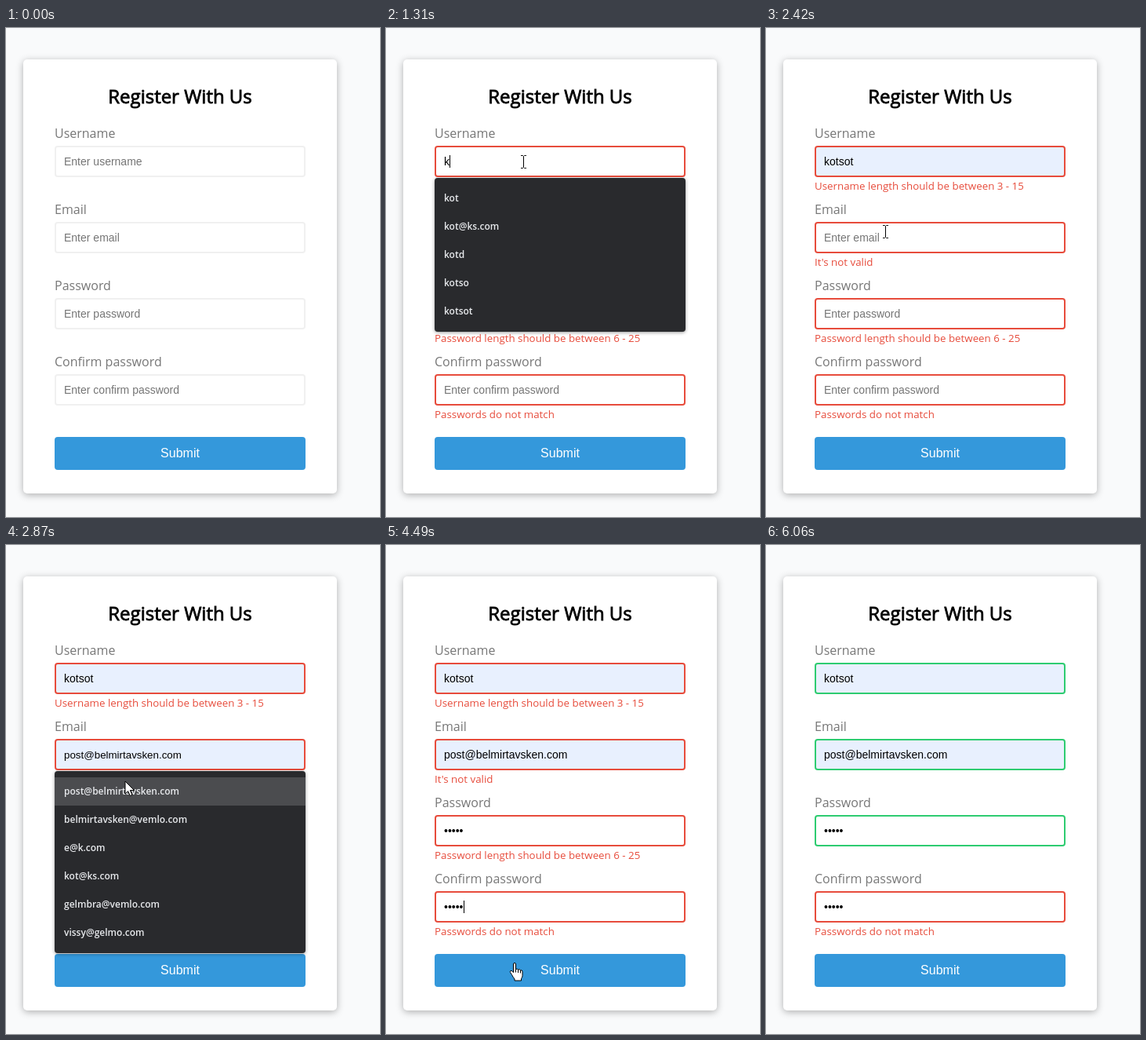
Recreate the animation shown at these times as an HTML page with a canvas. Size 477x623 px, loop 6.13 s.

```html
<!DOCTYPE html>
<html lang="en">
<head>
<meta charset="utf-8">
<title>Register form</title>
<style>
html, body { margin: 0; width: 100%; height: 100%; overflow: hidden; background: #f9fafb; }
canvas { display: block; width: 477px; height: 623px; }
</style>
</head>
<body>
<canvas id="stage" width="477" height="623"></canvas>
<script>
const ctx = document.getElementById('stage').getContext('2d');
const LOOP = 6130;
const SANS = '"Open Sans", sans-serif';
const ARIAL = '"Liberation Sans", Arial, sans-serif';
const RED = '#e74c3c', GREEN = '#2ecc71', PLAIN = '#f0f0f0';
const LEFT = 62, WIDTH = 320, ROW = 36, PAD = 8;

const USER = 'kotsot';
const MAIL = 'post@belmirtavsken.com';
const DOTS = '•••••';

const fields = [
  { label: 'Username', hint: 'Enter username', error: 'Username length should be between 3 - 15' },
  { label: 'Email', hint: 'Enter email', error: "It's not valid" },
  { label: 'Password', hint: 'Enter password', error: 'Password length should be between 6 - 25' },
  { label: 'Confirm password', hint: 'Enter confirm password', error: 'Passwords do not match' }
];
fields.forEach((f, i) => { f.y = 150 + i * 97; });

// Suggestion lists: field index, open and close times
const menus = [
  { field: 0, from: 960, to: 1310, items: ['belmirtavsken@vemlo.com', 'belmirtavsken', 'e@k.com', 'Gelmbra', 'VissyGelmo', 'belmirtavsken275'] },
  { field: 0, from: 1310, to: 1980, items: ['kot', 'kot@ks.com', 'kotd', 'kotso', USER] },
  { field: 1, from: 2640, to: 3180, items: [MAIL, 'belmirtavsken@vemlo.com', 'e@k.com', 'kot@ks.com', 'gelmbra@vemlo.com', 'vissy@gelmo.com'] }
];

// Pointer path: time, x, y
const path = [
  [50, 262, 640], [230, 275, 551], [500, 275, 551], [620, 288, 528],
  [930, 173, 169], [1300, 173, 169], [1500, 378, 245], [1690, 226, 368],
  [2000, 226, 368], [2380, 152, 259], [2700, 152, 259], [2950, 152, 314],
  [3180, 152, 314], [3310, 151, 350], [3700, 151, 350], [3920, 155, 448],
  [4200, 155, 448], [4480, 164, 533], [4860, 164, 533], [5220, 198, 388],
  [5280, 198, 390], [5480, 255, 640]
];
const presses = [[280, 480], [930, 1060], [1700, 1920], [2600, 2720], [3080, 3180], [3310, 3400], [3920, 4010], [4720, 4860]];
const focusTimes = [[960, 1980], [2620, 3180], [3310, 3920], [3920, 4720]];

const arrow = new Path2D('M0 0v16l3.7-3.5 2.6 6 2.6-1.1-2.6-5.9h5.2z');
const hand = new Path2D('M-1.5 1a1.5 1.5 0 0 1 3 0v6.5q2-1 3 .5q2-.8 3 .7q2.3-.5 2.5 1.8v5q0 2-1.5 4v2.5h-8.5v-2q-2-2.5-3.5-5.5l-2-3q-.8-1.5.5-2t2.5 1l1 1.2z');
const knuckles = new Path2D('M1.5 7.5v4M4.5 8v4M7.5 9v3.5');
const beam = new Path2D('M-3.5-7.5h2.5l1 1 1-1h2.5M0-6.5v14M-3.5 8.5h2.5l1-1 1 1h2.5');

const within = (t, [a, b]) => t >= a && t < b;
const clamp = (v, lo, hi) => Math.max(lo, Math.min(hi, v));
const dots = (t, start) => DOTS.slice(0, clamp(Math.floor((t - start) / 60), 0, 5));

function text(str, x, y, font, color, align = 'left') {
  ctx.font = font;
  ctx.fillStyle = color;
  ctx.textAlign = align;
  ctx.fillText(str, x, y);
}

function box(x, y, w, h, r, fill) {
  ctx.beginPath();
  ctx.roundRect(x, y, w, h, r);
  ctx.fillStyle = fill;
  ctx.fill();
}

function shadowBox(x, y, w, h, r, fill, blur, alpha) {
  ctx.save();
  ctx.shadowColor = `rgba(0,0,0,${alpha})`;
  ctx.shadowBlur = blur;
  ctx.shadowOffsetY = blur > 5 ? 2 : 1;
  box(x, y, w, h, r, fill);
  ctx.restore();
}

function pointerAt(t) {
  const i = path.findIndex(p => p[0] > t);
  if (i < 1) return null;
  const [t0, x0, y0] = path[i - 1], [t1, x1, y1] = path[i];
  const k = (t - t0) / (t1 - t0), e = k * k * (3 - 2 * k);
  return { x: x0 + (x1 - x0) * e, y: y0 + (y1 - y0) * e };
}

const menuTop = menu => fields[menu.field].y + 41;
const menuHeight = menu => menu.items.length * ROW + PAD * 2;

function hoveredRow(menu, p) {
  if (!menu || !p || p.x < LEFT || p.x > LEFT + WIDTH) return -1;
  const row = Math.floor((p.y - menuTop(menu) - PAD) / ROW);
  return row < menu.items.length ? Math.max(row, -1) : -1;
}

function valueOf(i, t) {
  if (i === 0) {
    if (t >= 1980) return { str: USER, filled: true, size: 14 };
    return { str: USER.slice(0, clamp(Math.floor((t - 1250) / 60), 0, 3)), size: 14 };
  }
  if (i === 1) return t >= 3180 ? { str: MAIL, filled: true, size: t < 3290 ? 13.33 : 14 } : { str: '', size: 14 };
  return { str: dots(t, i === 2 ? 3480 : 4000), size: 14 };
}

function drawField(f, i, t, preview) {
  const state = t < 440 ? PLAIN : t >= 4840 && i < 3 ? GREEN : RED;
  const value = preview ? { str: preview, filled: true, size: 13.33 } : valueOf(i, t);
  text(f.label, LEFT, f.y - 10, '16px ' + SANS, '#777');
  box(LEFT, f.y, WIDTH, 40, 4, state);
  box(LEFT + 2, f.y + 2, WIDTH - 4, 36, 2, value.filled ? '#e8f0fe' : '#fff');
  text(value.str || f.hint, 74, f.y + 25, value.size + 'px ' + ARIAL, value.str ? '#000' : '#757575');
  if (!preview && within(t, focusTimes[i])) {
    const w = value.str ? ctx.measureText(value.str).width : 0;
    ctx.fillStyle = '#000';
    ctx.fillRect(Math.round(74 + w), f.y + 12, 1, 16);
  }
  if (state === RED) text(f.error, LEFT, f.y + 56, '13.333px ' + SANS, RED);
}

function drawMenu(menu, row) {
  const top = menuTop(menu);
  shadowBox(LEFT, top, WIDTH, menuHeight(menu), 4, '#292a2d', 4, 0.4);
  menu.items.forEach((item, i) => {
    const y = top + PAD + i * ROW;
    if (i === row) {
      ctx.fillStyle = '#4b4c4f';
      ctx.fillRect(LEFT, y, WIDTH, ROW);
    }
    text(item, 74, y + 22, '600 12px ' + SANS, '#e8eaed');
  });
}

function drawPointer(p, t, menu) {
  if (presses.some(s => within(t, s))) {
    ctx.beginPath();
    ctx.arc(p.x - 1, p.y - 1, 12, 0, Math.PI * 2);
    ctx.fillStyle = 'rgba(255,255,0,.55)';
    ctx.fill();
  }
  const inColumn = p.x >= LEFT && p.x <= LEFT + WIDTH;
  const inMenu = menu && p.y >= menuTop(menu) && p.y < menuTop(menu) + menuHeight(menu);
  const inField = inColumn && !inMenu && fields.some(f => p.y >= f.y && p.y < f.y + 40);
  const inButton = inColumn && p.y >= 521 && p.y < 563;
  ctx.save();
  ctx.translate(Math.round(p.x) + (inField ? 0.5 : 0), Math.round(p.y));
  ctx.strokeStyle = '#000';
  ctx.fillStyle = '#fff';
  ctx.lineWidth = 1;
  ctx.lineJoin = 'round';
  if (inField) {
    ctx.stroke(beam);
  } else {
    const shape = inButton ? hand : arrow;
    ctx.fill(shape);
    ctx.stroke(shape);
    if (inButton) ctx.stroke(knuckles);
  }
  ctx.restore();
}

function draw(t) {
  const p = pointerAt(t);
  const menu = menus.find(m => within(t, [m.from, m.to]));
  const row = hoveredRow(menu, p);

  ctx.fillStyle = '#f9fafb';
  ctx.fillRect(0, 0, 477, 623);
  shadowBox(22, 40, 400, 553, 5, '#fff', 10, 0.3);

  // Regular weight thickened by a thin outline
  text('Register With Us', 222, 96, '24px ' + SANS, '#000', 'center');
  ctx.strokeStyle = '#000';
  ctx.lineWidth = 0.8;
  ctx.strokeText('Register With Us', 222, 96);

  fields.forEach((f, i) => {
    const preview = menu && menu.field === i && row >= 0 ? menu.items[row] : '';
    drawField(f, i, t, preview);
  });
  box(LEFT, 521, WIDTH, 42, 4, '#3498db');
  text('Submit', 222, 547, '16px ' + ARIAL, '#fff', 'center');

  if (menu) drawMenu(menu, row);
  if (p) drawPointer(p, t, menu);
}

const start = performance.now();
function tick() {
  draw((performance.now() - start) % LOOP);
  requestAnimationFrame(tick);
}
tick();
</script>
</body>
</html>
```
